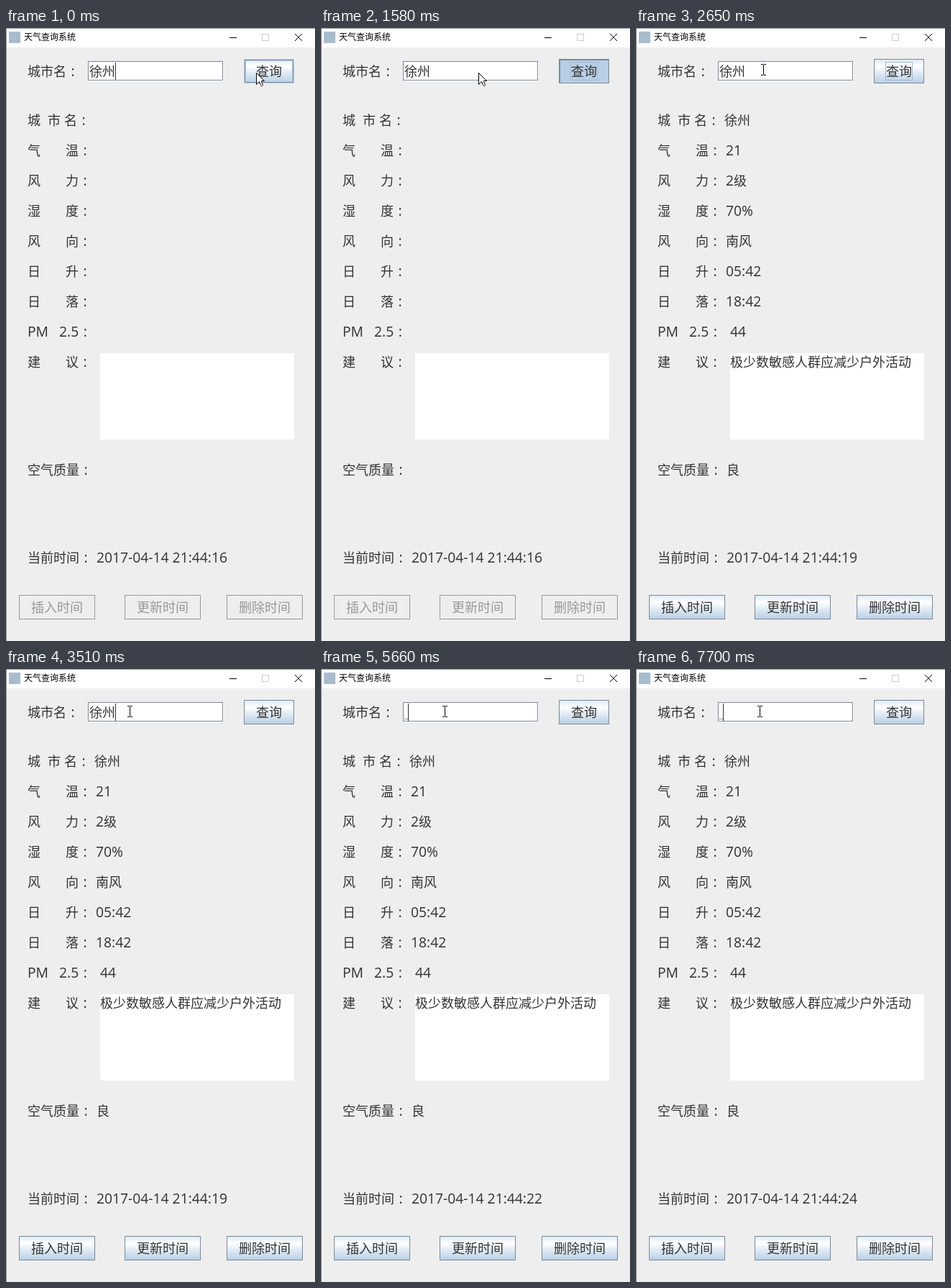
Recreate the animation shown at these times as an HTML page with a canvas. Size 430 by 852 pixels, loop 8000 ms.

```html
<!DOCTYPE html>
<html lang="zh-CN">
<head>
<meta charset="utf-8">
<title>天气查询系统</title>
<style>
  html, body { margin: 0; width: 100%; height: 100%; overflow: hidden; background: #eee; }
  canvas { display: block; }
</style>
</head>
<body>
<canvas id="stage" width="430" height="852"></canvas>
<script>
const ctx = document.getElementById('stage').getContext('2d');
const LOOP = 8000;
const INK = '#333', DARK = '#7a8a99', PALE = '#b8cfe5', MUTED = '#999';
const CJK = '"Noto Sans CJK SC", "Noto Sans CJK", sans-serif';
const LATIN = '"Open Sans", "Noto Sans", sans-serif';

// Each track lists [start time, value]; values hold until the next entry.
const POINTER = [
  [0, ['arrow', 348, 62]], [150, ['arrow', 338, 56]], [730, ['arrow', 285, 77]],
  [880, ['arrow', 241, 77]], [1030, ['arrow', 233, 69]], [1170, ['arrow', 227, 66]],
  [1580, ['arrow', 219, 62]], [1740, ['arrow', 216, 59]], [2260, ['arrow', 204, 58]],
  [2380, ['arrow', 193, 57]], [2530, ['beam', 181, 58]], [2650, ['beam', 177, 58]],
  [2810, ['beam', 172, 59]]
];
const QUERY = [[0, 'hover'], [300, 'pressed'], [2650, 'focused'], [3510, 'normal']];
const CARET = [
  [0, 152], [300, 0], [3510, 152], [3970, 0], [4530, 152], [4960, 134],
  [5230, 116], [5540, 121], [6650, 0], [6800, 121], [7460, 0], [7580, 121]
];
const FIELD = [[0, '徐州'], [4960, '徐'], [5230, '']];
const SECONDS = [[0, 16], [2650, 19], [3670, 20], [4680, 21], [5660, 22], [6650, 23], [7700, 24]];
const LOADED_AT = 2650, COMPOSING_AT = 5540;

const ROWS = [
  ['城  市 名：', '徐州', 123], ['气       温：', '21', 125], ['风       力：', '2级', 125],
  ['湿       度：', '70%', 125], ['风       向：', '南风', 125], ['日       升：', '05:42', 125],
  ['日       落：', '18:42', 125], ['PM   2.5：', '44', 131], ['建       议：', '极少数敏感人群应减少户外活动', 131]
];

function at(track, time) {
  let value = track[0][1];
  for (const [start, next] of track) if (time >= start) value = next;
  return value;
}

function box(x, y, w, h, color) {
  ctx.fillStyle = color;
  ctx.fillRect(x, y, w, h);
}

function outline(x, y, w, h, color) {
  ctx.strokeStyle = color;
  ctx.lineWidth = 1;
  ctx.strokeRect(x + 0.5, y + 0.5, w - 1, h - 1);
}

// Mixed text: 18px ideographs, slightly larger Latin runs, centred wide colons.
function text(str, x, y, color = INK) {
  ctx.fillStyle = color;
  for (const run of str.match(/[\u4e00-\u9fff]+|：|[ -~]+/g) || []) {
    const han = run.charCodeAt(0) > 127 && run !== '：';
    ctx.font = han ? `18px ${CJK}` : `19.3px ${LATIN}`;
    if (run === '：') {
      ctx.fillText(':', x + 9 - ctx.measureText(':').width / 2, y);
      x += 18;
    } else {
      ctx.fillText(run, x, y);
      x += ctx.measureText(run).width;
    }
  }
}

function button(x, y, w, h, label, state) {
  if (state === 'pressed') {
    box(x, y, w, h, PALE);
    outline(x, y, w, h, DARK);
    box(x, y, w, 2, DARK);
    box(x, y, 2, h, DARK);
  } else if (state === 'disabled') {
    outline(x, y, w, h, MUTED);
  } else {
    const fill = ctx.createLinearGradient(0, y, 0, y + h);
    fill.addColorStop(0, '#dde8f3');
    fill.addColorStop(0.3, '#fff');
    fill.addColorStop(0.6, '#dde8f3');
    fill.addColorStop(1, PALE);
    box(x, y, w, h, fill);
    if (state === 'hover') {
      [PALE, DARK, PALE].forEach((color, i) => outline(x + i, y + i, w - 2 * i, h - 2 * i, color));
    } else {
      outline(x, y, w, h, DARK);
    }
  }
  const left = x + (w - label.length * 18) / 2;
  if (state === 'pressed' || state === 'focused') {
    outline(left - 1, y + 4, label.length * 18 + 2, 26, '#a3b8cc');
  }
  text(label, left, y + 24, state === 'disabled' ? MUTED : INK);
}

function titleBar() {
  box(0, 0, 430, 27, '#fff');
  box(4, 5, 16, 16, '#a9bccb');
  ctx.fillStyle = '#000';
  ctx.font = `12px ${CJK}`;
  ctx.fillText('天气查询系统', 25, 17);
  box(311, 13, 10, 1, '#000');
  outline(356, 8, 10, 10, '#ccc');
  ctx.strokeStyle = '#000';
  ctx.beginPath();
  ctx.moveTo(402, 8); ctx.lineTo(412, 18);
  ctx.moveTo(412, 8); ctx.lineTo(402, 18);
  ctx.stroke();
  box(0, 0, 430, 1, '#999');
  box(0, 0, 1, 852, '#999');
}

function pointer([kind, x, y]) {
  if (kind === 'beam') {
    box(x, y - 7, 1, 14, '#000');
    for (const edge of [y - 8, y + 7]) {
      box(x - 3, edge, 3, 1, '#000');
      box(x + 1, edge, 3, 1, '#000');
    }
    return;
  }
  ctx.beginPath();
  for (const [dx, dy] of [[0, 0], [0, 16], [4, 12], [6, 17], [7, 18], [8, 18], [9, 17], [7, 12], [7, 11], [11, 11]]) {
    ctx.lineTo(x + dx + 0.5, y + dy + 0.5);
  }
  ctx.closePath();
  ctx.fillStyle = '#fff';
  ctx.fill();
  ctx.strokeStyle = '#000';
  ctx.lineWidth = 1;
  ctx.stroke();
}

function inputField(time) {
  box(115, 47, 188, 27, '#fff');
  outline(114, 46, 188, 27, DARK);
  text(at(FIELD, time), 116, 67);
  if (time >= COMPOSING_AT) for (let x = 116; x < 121; x += 2) box(x, 69, 1, 1, INK);
  const caret = at(CARET, time);
  if (caret) box(caret, 48, 1, 24, INK);
}

function draw(time) {
  const loaded = time >= LOADED_AT;
  box(0, 0, 430, 852, '#eee');
  titleBar();
  text('城市名：', 30, 67);
  inputField(time);
  button(331, 43, 70, 34, '查询', at(QUERY, time));

  box(131, 452, 270, 120, '#fff');
  ROWS.forEach(([label, value, x], i) => {
    const y = 135 + i * 42;
    text(label, 30, y);
    if (loaded) text(value, x, y);
  });
  text('空气质量：', 30, 621);
  if (loaded) text('良', 126, 621);
  text('当前时间：', 30, 743);
  text(`2017-04-14 21:44:${at(SECONDS, time)}`, 126, 743);

  ['插入时间', '更新时间', '删除时间'].forEach((label, i) => {
    button([18, 165, 307][i], 788, 106, 34, label, loaded ? 'normal' : 'disabled');
  });
  pointer(at(POINTER, time));
}

const start = performance.now();
function tick() {
  draw((performance.now() - start) % LOOP);
  requestAnimationFrame(tick);
}
draw(0);
requestAnimationFrame(tick);
</script>
</body>
</html>
```
